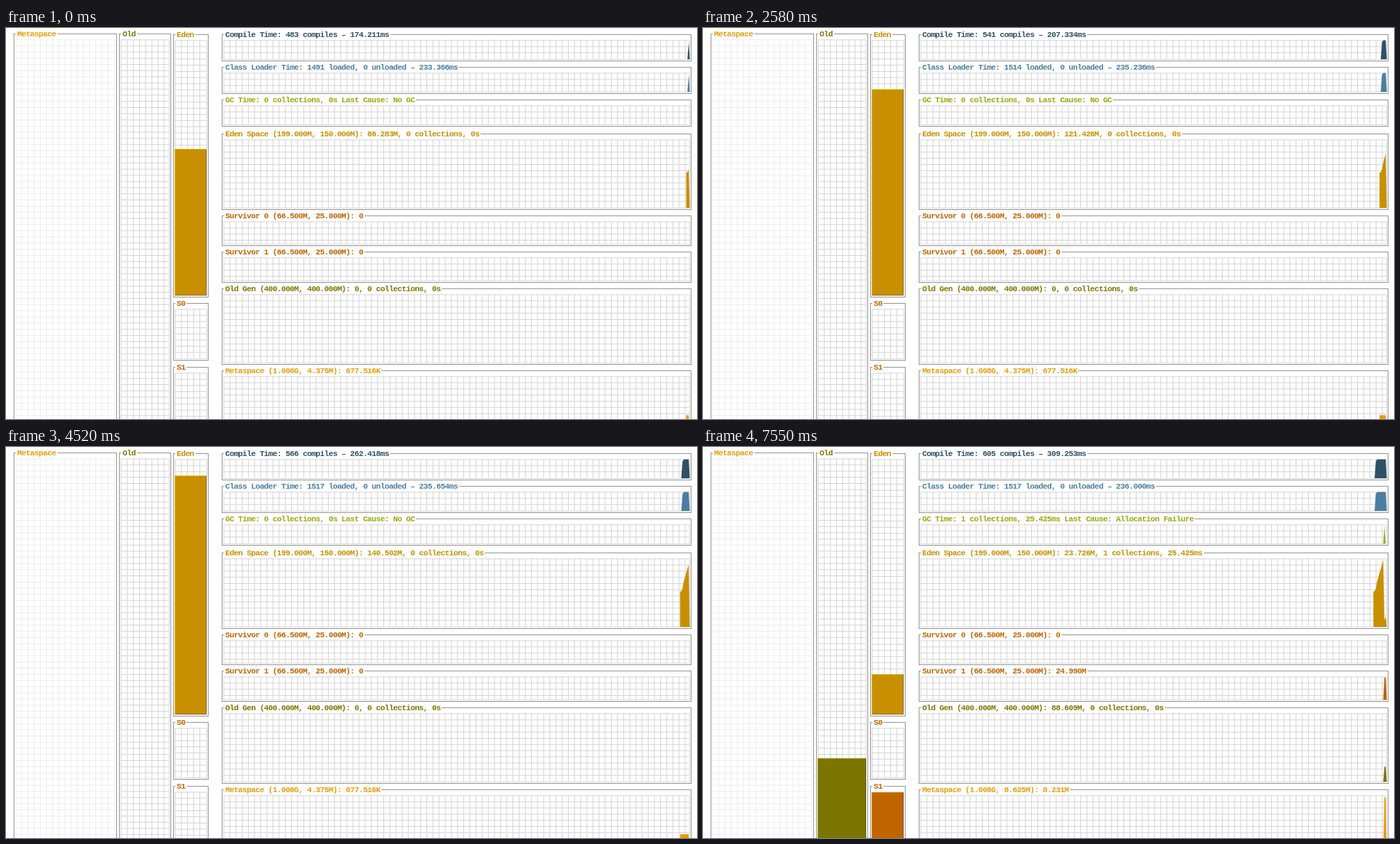
An HTML page that plays this animation: 996 by 563 pixels, repeating every 8 s.

```html
<!DOCTYPE html>
<html lang="en">
<head>
<meta charset="utf-8">
<title>Memory monitor</title>
<style>
html, body { margin: 0; width: 100%; height: 100%; overflow: hidden; background: #fff; }
svg { display: block; }
text { font: bold 11.5px "Liberation Mono", monospace; letter-spacing: -0.693px; white-space: pre; }
.crisp { shape-rendering: crispEdges; }
</style>
</head>
<body>
<svg id="stage" width="996" height="563" viewBox="0 0 996 563"></svg>
<script>
const stage = document.getElementById('stage');
const LOOP = 8000, CELL = 8.868, CHAR = 6.208, STEP = 1.774, NEWEST = 984;
const times = [0, 550, 1570, 2580, 3510, 4520, 5530, 6540, 7550];
const GC_AT = 7;

const compiles = [483, 509, 529, 541, 550, 566, 580, 589, 605];
const compileMs = [174.211, 190.127, 200.569, 207.334, 213.476, 262.418, 295.037, 298.529, 309.253];
const loaded = [1491, 1504, 1512, 1514, 1516, 1517, 1517, 1517, 1517];
const loadMs = [233.366, 234.212, 234.981, 235.236, 235.489, 235.654, 235.801, 235.871, 236];
const eden = [86.283, 102.401, 111.877, 121.426, 130.971, 140.502, 150, 14.298, 23.726];

const color = {
  compile: '#2f5166', load: '#4c7ea3', gc: '#98aa0a', eden: '#c89000',
  surv: '#c06400', old: '#7c7600', meta: '#e89c0c'
};

function add(tag, attrs, parent = stage) {
  const el = document.createElementNS('http://www.w3.org/2000/svg', tag);
  for (const k in attrs) el.setAttribute(k, attrs[k]);
  parent.appendChild(el);
  return el;
}

function gridPath({ x, y, r, b }) {
  let d = `M${x + .5} ${y + .5}H${r + .5}V${b + .5}H${x + .5}Z`;
  for (let gx = x + CELL; gx < r - 2; gx += CELL) d += `M${gx + .5} ${y}V${b}`;
  for (let gy = y + CELL; gy < Math.min(b - 2, 570); gy += CELL) d += `M${x} ${gy + .5}H${r}`;
  return d;
}

// Titled frame with a ruled area inside
function panel(x, y, r, b, fill, gridColor = '#d2d2d2') {
  const inner = { x: x + 2.4, y: y + 7.5, r: r - 2.2, b: b - 2.2 };
  add('path', { d: gridPath(inner), stroke: gridColor, fill: 'none' });
  const frame = add('path', { class: 'crisp', stroke: '#929292', fill: 'none' });
  const area = add('g', {});
  const label = add('text', { x: x + 5, y: y + 3, fill });
  let shown = '';
  function title(s) {
    if (s === shown) return;
    shown = s;
    label.textContent = s;
    const end = x + 7 + s.length * CHAR;
    const top = y - .5;
    frame.setAttribute('d', `M${x + 3} ${top}H${x + .5}V${b + .5}H${r + .5}V${top}H${end}`);
  }
  return { inner, area, title, fill };
}

// Column gauge with raised edges
function gauge(p, light, dark) {
  const x = Math.round(p.inner.x), r = Math.round(p.inner.r), b = Math.round(p.inner.b);
  const face = add('path', { class: 'crisp', fill: p.fill }, p.area);
  const hi = add('path', { class: 'crisp', fill: 'none', stroke: light }, p.area);
  const lo = add('path', { class: 'crisp', fill: 'none', stroke: dark }, p.area);
  return h => {
    const top = Math.round(b - h);
    p.area.setAttribute('display', h ? 'inline' : 'none');
    face.setAttribute('d', `M${x} ${top}H${r}V${b}H${x}Z`);
    hi.setAttribute('d', `M${x + .5} ${b - 1}V${top + .5}H${r - 1}`);
    lo.setAttribute('d', `M${r - .5} ${top + 1}V${b - .5}H${x + 1}`);
  };
}

// Area chart whose newest sample sits at the right edge
function chart(p) {
  const shape = add('polygon', { fill: p.fill }, p.area);
  return (now, first, height) => {
    const base = p.inner.b + .2;
    const at = i => NEWEST - (now - i) * STEP;
    const pts = [[at(first), base]];
    for (let i = first; i <= now; i++) pts.push([at(i), base - height(i)]);
    pts.push([985.6, base]);
    shape.setAttribute('points', pts.map(q => q.join()).join(' '));
  };
}

const metaCol = panel(11, 9, 159, 620, color.meta, '#ececec');
const oldCol = panel(163, 9, 237, 620, color.old);
const edenCol = panel(241, 10, 291, 387, color.eden);
const s0Col = panel(241, 397, 291, 478, color.surv);
const s1Col = panel(241, 489, 291, 620, color.surv);
metaCol.title('Metaspace');
oldCol.title('Old');
edenCol.title('Eden');
s0Col.title('S0');
s1Col.title('S1');
const oldGauge = gauge(oldCol, '#a8a400', '#5a5500');
const edenGauge = gauge(edenCol, '#dcc000', '#966a00');
const s1Gauge = gauge(s1Col, '#dc8400', '#8a4800');

const wide = (y, b, fill) => panel(311, y, 987, b, fill);
const compileP = wide(10, 47, color.compile);
const loadP = wide(57, 94, color.load);
const gcP = wide(104, 141, color.gc);
const edenP = wide(153, 261, color.eden);
const s0P = wide(271, 313, color.surv);
const s1P = wide(323, 366, color.surv);
const oldP = wide(376, 484, color.old);
const metaP = wide(494, 602, color.meta);
const [compileC, loadC, gcC, edenC, s1C, oldC, metaC] =
  [compileP, loadP, gcP, edenP, s1P, oldP, metaP].map(chart);
s0P.title('Survivor 0 (66.500M, 25.000M): 0');

function draw(n) {
  const done = n >= GC_AT;
  const gcTime = done ? '25.425ms' : '0s';
  const runs = done ? 1 : 0;
  const after = h => i => i >= GC_AT ? h : 0;
  const busy = i => i < 0 ? 0 : i ? 27.3 : 24.3;

  compileP.title(`Compile Time: ${compiles[n]} compiles – ${compileMs[n].toFixed(3)}ms`);
  loadP.title(`Class Loader Time: ${loaded[n]} loaded, 0 unloaded – ${loadMs[n].toFixed(3)}ms`);
  gcP.title(`GC Time: ${runs} collections, ${gcTime} Last Cause: ${done ? 'Allocation Failure' : 'No GC'}`);
  edenP.title(`Eden Space (199.000M, 150.000M): ${eden[n].toFixed(3)}M, ${runs} collections, ${gcTime}`);
  s1P.title(`Survivor 1 (66.500M, 25.000M): ${done ? '24.990M' : '0'}`);
  oldP.title(`Old Gen (400.000M, 400.000M): ${done ? '88.609M' : '0'}, 0 collections, 0s`);
  metaP.title(done ? 'Metaspace (1.008G, 8.625M): 8.231M' : 'Metaspace (1.008G, 4.375M): 677.516K');

  edenGauge(eden[n] / 150 * 367);
  oldGauge(done ? 170 : 0);
  s1Gauge(done ? 121 : 0);

  compileC(n, -1, busy);
  loadC(n, -1, busy);
  gcC(n, -1, i => i === GC_AT ? 25 : 0);
  edenC(n, -2, i => (i < 0 ? 80 : eden[i]) * .64);
  s1C(n, -1, after(32.2));
  oldC(n, -1, after(21.8));
  metaC(n, -2, i => i >= GC_AT ? 95.5 : done ? 20 : 42.5);
}

let last = -1;
function tick(now) {
  const t = now % LOOP;
  let n = times.length - 1;
  while (times[n] > t) n--;
  if (n !== last) draw(last = n);
  requestAnimationFrame(tick);
}
draw(0);
requestAnimationFrame(tick);
</script>
</body>
</html>
```
